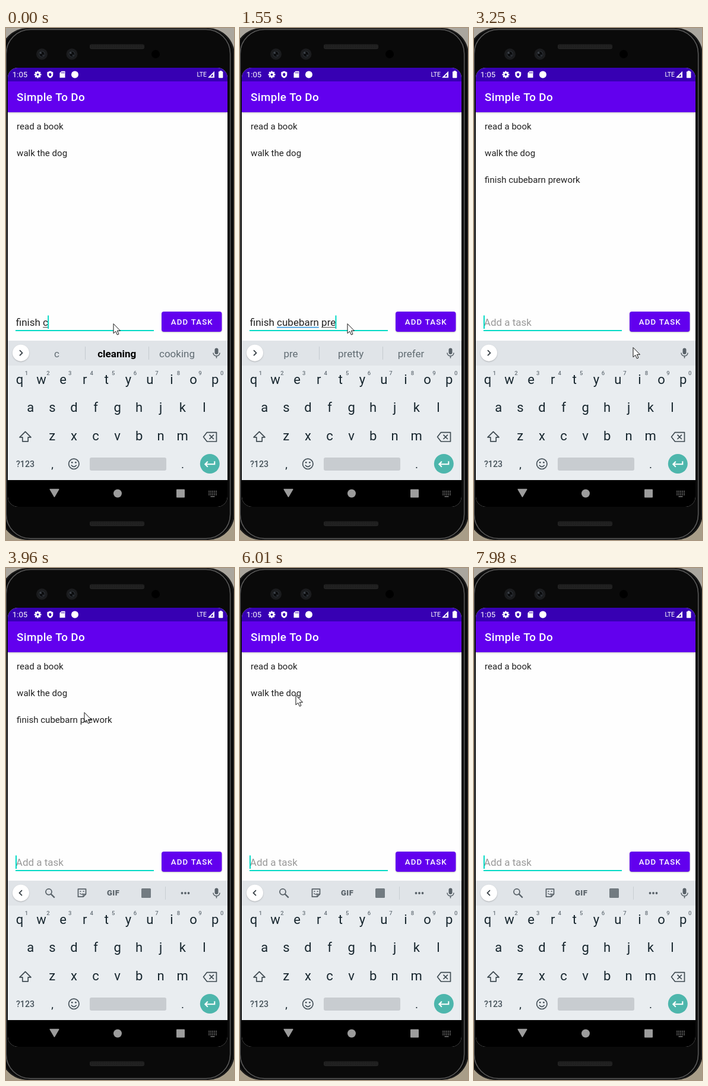
An HTML page with a canvas for the animation above (8 s loop, 384 by 863 pixels).

```html
<!DOCTYPE html>
<html lang="en">
<head>
<meta charset="utf-8">
<title>Simple To Do</title>
<style>
html, body { margin: 0; width: 100%; height: 100%; overflow: hidden; background: #000; }
canvas { display: block; width: 384px; height: 863px; }
</style>
</head>
<body>
<canvas id="stage"></canvas>
<script>
const W = 384, H = 863, LOOP = 8000;
const canvas = document.getElementById('stage');
const ctx = canvas.getContext('2d');
const ratio = window.devicePixelRatio || 1;
canvas.width = W * ratio;
canvas.height = H * ratio;

const TEAL = '#03dac5', PURPLE = '#6200ee', ICON = '#596269';
const INPUT_X = 16.8, INPUT_SIZE = 17;
const TASK = 'finish cubebarn prework';

// [start, typed text, suggestions, index of the bold one]
const typing = [
  [0, 'finish c', ['c', 'cleaning', 'cooking'], 1],
  [130, 'finish cu', ['cu', 'cut', 'cute'], 1],
  [280, 'finish cub', ['cub', 'cube', 'cubs'], -1],
  [430, 'finish cube', ['cube', 'cubes', 'cubed'], -1],
  [570, 'finish cubeb', ['cubeb', 'cube', 'cubes'], 1],
  [710, 'finish cubebar', ['cubebar', 'cube bar', 'cubes'], 1],
  [850, 'finish cubebarn', ['cubebarn', 'cube barn', 'cubes'], -1],
  [1280, 'finish cubebarn p', ['p', 'project', 'part'], -1],
  [1420, 'finish cubebarn pr', ['pr', 'project', 'pretty'], -1],
  [1550, 'finish cubebarn pre', ['pre', 'pretty', 'prefer'], -1],
  [1700, 'finish cubebarn prewo', ['prewo', 'prework', 'prewar'], 1],
  [1850, TASK, ['prework', 'pre-work', ''], 1],
  [2980, '', [], -1]
];

// [start, x, y] of the pointer tip
const pointer = [
  [0, 181, 498], [2260, 222, 502], [2410, 290, 509], [2560, 328, 514],
  [2710, 327, 505], [2850, 322, 499], [3100, 299, 516], [3250, 268, 538],
  [3400, 252, 505], [3540, 222, 430], [3680, 185, 346], [3820, 150, 277],
  [3960, 132, 243], [4100, 126, 238], [4240, 123, 248], [4380, 122, 254],
  [5300, 117, 247], [5430, 105, 231], [5570, 97, 219], [5700, 94, 214],
  [6580, 98, 230], [6720, 115, 290], [6860, 128, 370], [7000, 122, 440],
  [7140, 105, 490], [7290, 90, 513], [7430, 82, 505]
];

// Moments at which the caret switches, starting from on
const blinks = [2410, 2850, 3540, 3960, 4530, 4990, 5430, 6010, 6440, 7000, 7430, 7980];

const at = (list, t) => list.filter(k => k[0] <= t).pop();

function text(s, x, y, size, color, { weight = 400, align = 'left', spacing = 0 } = {}) {
  ctx.font = `${weight} ${size}px Roboto, sans-serif`;
  ctx.letterSpacing = spacing + 'px';
  ctx.textAlign = align;
  ctx.fillStyle = color;
  ctx.fillText(s, x, y);
}

function rect(x, y, w, h, color, r = 0) {
  ctx.fillStyle = color;
  ctx.beginPath();
  ctx.roundRect(x, y, w, h, r);
  ctx.fill();
}

function outline(x, y, w, h, r, color, width) {
  ctx.strokeStyle = color;
  ctx.lineWidth = width;
  ctx.beginPath();
  ctx.roundRect(x, y, w, h, r);
  ctx.stroke();
}

function disc(x, y, r, color) {
  ctx.fillStyle = color;
  ctx.beginPath();
  ctx.arc(x, y, r, 0, 7);
  ctx.fill();
}

function ring(x, y, r, color, width) {
  ctx.strokeStyle = color;
  ctx.lineWidth = width;
  ctx.beginPath();
  ctx.arc(x, y, r, 0, 7);
  ctx.stroke();
}

// SVG path data moved to (x, y)
function path(d, x, y, { fill, stroke, width = 1.6, join = 'miter' }) {
  const p = new Path2D(d);
  ctx.save();
  ctx.translate(x, y);
  if (fill) { ctx.fillStyle = fill; ctx.fill(p); }
  if (stroke) {
    ctx.strokeStyle = stroke;
    ctx.lineWidth = width;
    ctx.lineJoin = join;
    ctx.stroke(p);
  }
  ctx.restore();
}

function shadow(color, blur, dy) {
  ctx.shadowColor = color;
  ctx.shadowBlur = blur * ratio;
  ctx.shadowOffsetY = dy * ratio;
}
const noShadow = () => shadow('transparent', 0, 0);

function speaker(y) {
  rect(141, y, 92, 8, '#242424', 3);
  ctx.fillStyle = '#151515';
  for (let x = 143; x < 232; x += 3)
    for (let row = 1; row < 7; row += 3) ctx.fillRect(x, y + row, 1.5, 1.5);
}

function camera(x) {
  disc(x, 44, 9.5, '#1b1c1e');
  disc(x, 44, 6, '#0b0c0e');
  ring(x, 44, 5, '#2b2f34', 1.5);
  disc(x - 2, 42, 1.5, '#474d55');
  disc(x + 2, 46, 1.2, '#33383f');
}

function drawPhone() {
  const back = ctx.createLinearGradient(0, 0, 0, H);
  back.addColorStop(0, '#aaa69e');
  back.addColorStop(1, '#a89d88');
  ctx.fillStyle = back;
  ctx.fillRect(0, 0, W, H);
  rect(-9, 0, 394, H, '#0a0a0a', 45);
  outline(-7.5, 1, 391, H - 2, 44, '#2c2c2c', 1);
  outline(0.3, 2.5, 377.4, H - 5, 41, '#585858', 1.6);
  speaker(27.5);
  speaker(831.5);
  camera(60.5);
  camera(111);
  disc(252, 44, 7, '#000');
}

function drawGear(x, y) {
  for (let i = 0; i < 8; i++) {
    ctx.save();
    ctx.translate(x, y);
    ctx.rotate(i * Math.PI / 4);
    rect(-1.3, -6, 2.6, 4, '#fff', 0.5);
    ctx.restore();
  }
  ring(x, y, 3.3, '#fff', 2.4);
}

function drawBars() {
  shadow('rgba(0,0,0,.25)', 2.5, 1);
  rect(3, 90, 370, 52, PURPLE);
  noShadow();
  rect(3, 67, 370, 23, '#3700b3');
  text('1:05', 10.8, 83, 13.2, '#fff');
  drawGear(53.5, 78.5);
  path('M0-6L5-4V0C5 3 3 5 0 6C-3 5-5 3-5 0V-4Z', 74.3, 78.5, { fill: '#fff' });
  path('M0-3.2L3 0H1.7V2.6H-1.7V0H-3Z', 74.3, 78.5, { fill: '#3700b3' });
  path('M-1.5-5.5H4.5V5.5H-4.5V-2.5Z', 95, 78.3, { fill: '#fff' });
  for (const x of [93.2, 95.2, 97.2]) rect(x, 74.3, 1, 2.3, '#3700b3');
  disc(116, 78.5, 6, '#fff');
  text('LTE', 321.5, 82.3, 10.5, '#fff');
  path('M11 0V11H0Z', 340, 72.8, { fill: '#fff' });
  path('M8.5 5V9H4.5Z', 340, 72.8, { fill: '#3700b3' });
  rect(358, 73.2, 7.4, 11, '#fff', 1);
  rect(360, 72, 3.4, 2, '#fff');
  text('Simple To Do', 18.07, 123.4, 18.84, '#fff', { weight: 500, spacing: 0.35 });
}

function drawList(t) {
  const tasks = ['read a book'];
  if (t < 6440) tasks.push('walk the dog');
  if (t >= 2980 && t < 4990) tasks.push(TASK);
  tasks.forEach((s, i) => text(s, 18.07, 170.8 + i * 45.2, 15.07, '#222'));
}

function drawInput(t, typed) {
  const measure = s => ctx.measureText(s).width;
  rect(16, 509, 233, 2, TEAL);
  text(typed || 'Add a task', INPUT_X, 502.3, INPUT_SIZE, typed ? '#212121' : '#999');
  const words = typed.split(' ');
  let start = 0;
  words.forEach((word, i) => {
    const x = INPUT_X + measure(typed.slice(0, start));
    const done = i < words.length - 1;
    if (i === 1 && done) rect(x, 503.8, measure(word), 1.7, '#3f9fe0');
    else if (i > 0) rect(x, 504, measure(word), 1.1, '#4a4a4a');
    start += word.length + 1;
  });
  if (blinks.filter(b => b <= t).length % 2 === 0) {
    const x = typed ? INPUT_X + measure(typed) : INPUT_X;
    rect(x - 0.8, 484.5, 2, 22.5, TEAL);
  }
  shadow('rgba(0,0,0,.25)', 2, 1);
  rect(262, 478, 101.5, 34, t >= 2850 && t < 3100 ? '#7a2cf1' : PURPLE, 4);
  noShadow();
  text('ADD TASK', 277.8, 500.3, 13.19, '#fff', { weight: 500, spacing: 1.18 });
}

function drawTools() {
  ring(72, 545.8, 5, ICON, 1.8);
  path('M0 0L6 6', 75.8, 549.6, { stroke: ICON, width: 2.2 });
  path('M-6.5-6.5H6.5V2L2 6.5H-6.5Z', 128, 547.7, { stroke: ICON, width: 1.8, join: 'round' });
  path('M6.5 2H2V6.5M-3.5 0.5Q-1 4 2 1', 128, 547.7, { stroke: ICON, width: 1.4 });
  disc(125.4, 545, 1.1, ICON);
  disc(130.6, 545, 1.1, ICON);
  text('GIF', 180.7, 552.3, 13, ICON, { weight: 900, align: 'center', spacing: 0.5 });
  rect(228, 540, 16, 16, '#727b81', 1.5);
  rect(268, 537, 1, 22, '#c9ced2');
  for (const x of [296.5, 302, 307.5]) disc(x, 548, 1.9, ICON);
}

function drawStrip(t, words, bold) {
  const tools = t >= 3540;
  rect(3, 527, 370, 42, '#e0e4e8');
  shadow('rgba(0,0,0,.22)', 2, 1);
  disc(25, 547.7, 14, '#fff');
  noShadow();
  path(tools ? 'M2-4.5L-2.5 0L2 4.5' : 'M-2-4.5L2.5 0L-2 4.5', 25, 547.7, { stroke: '#333c42', width: 1.7 });
  if (tools) drawTools();
  else if (words.length) {
    rect(133, 537, 1, 22, '#c5cacf');
    rect(240, 537, 1, 22, '#c5cacf');
    words.forEach((s, i) => {
      const strong = i === bold;
      text(s, [85.5, 186.7, 288][i], 554.5, 17, strong ? '#000' : '#616c73',
        { weight: strong ? 700 : 400, align: 'center' });
    });
  }
  rect(351.5, 539.5, 6, 10.5, ICON, 3);
  path('M-5.5-1C-5.5 6 5.5 6 5.5-1M0 4.5V8', 354.5, 548.5, { stroke: ICON, width: 1.6 });
}

function drawKeys() {
  const ink = '#17262e', pitch = 36.57;
  rect(3, 569, 370, 193, '#e9edf0');
  const row = (keys, x, y) => [...keys].forEach((k, i) =>
    text(k, x + i * pitch, y, 22, ink, { align: 'center' }));
  row('qwertyuiop', 23, 600.3);
  row('asdfghjkl', 41.3, 647.3);
  row('zxcvbnm', 77.8, 695.3);
  [...'1234567890'].forEach((k, i) =>
    text(k, 34.5 + i * pitch, 585.3, 9.5, '#667078', { weight: 500, align: 'center' }));

  path('M0-9L9.5 0.5H4.7V7.5H-4.7V0.5H-9.5Z', 32.5, 689.3, { stroke: '#3f4b52', width: 1.7, join: 'round' });
  path('M-5-7.7H11V7.7H-5L-11 0ZM-1-3.7L6.4 3.7M6.4-3.7L-1 3.7', 343.5, 689.3,
    { stroke: '#3f4b52', width: 1.7, join: 'round' });
  text('?123', 32.5, 740, 14.2, '#46525a', { weight: 500, align: 'center' });
  text(',', 78, 741.5, 19, ink, { align: 'center' });
  text('.', 297.5, 741.5, 19, ink, { align: 'center' });
  ring(114.3, 734.8, 8.7, '#46525a', 1.7);
  disc(111.2, 732.3, 1.4, '#46525a');
  disc(117.4, 732.3, 1.4, '#46525a');
  path('M-4.5 2Q0 7.5 4.5 2', 114.3, 734.8, { stroke: '#46525a' });
  rect(141, 724, 129, 22, '#c8ccd0', 3);
  disc(343.3, 734.5, 16.5, '#4db6ac');
  path('M8-5V0H-8M-3.5-4.5L-8 0L-3.5 4.5', 343.3, 735.3, { stroke: '#fff', width: 2 });
}

function drawNav() {
  const grey = '#9c9c9c';
  rect(3, 762, 370, 45, '#000');
  path('M-7.3-6.5H7.3L0 6Z', 81.5, 784, { fill: grey, stroke: grey, width: 1.5, join: 'round' });
  disc(188, 784.5, 7, grey);
  rect(287, 777.5, 14, 14, grey, 1);
  for (let y = 0; y < 3; y++)
    for (let x = 0; x < 5; x++) rect(341.2 + x * 3, 780 + y * 2.9, 1.7, 1.7, '#777');
  rect(344.5, 789, 7, 1.4, '#777');
}

function drawPointer(t) {
  if (t >= 7550) return;
  const [, x, y] = at(pointer, t);
  path('M0 0V16.2L3.8 12.8L6.4 18.6L9 17.4L6.4 11.8H11.5Z', x, y + 0.5,
    { fill: '#fff', stroke: '#111', width: 1 });
}

function draw(t) {
  const [, typed, words, bold] = at(typing, t);
  ctx.setTransform(ratio, 0, 0, ratio, 0, 0);
  drawPhone();
  ctx.save();
  ctx.beginPath();
  ctx.roundRect(3, 67, 370, 740, 17);
  ctx.clip();
  rect(3, 67, 370, 740, '#fefefe');
  drawBars();
  drawList(t);
  drawInput(t, typed);
  drawStrip(t, words, bold);
  drawKeys();
  drawNav();
  ctx.restore();
  drawPointer(t);
}

let begin;
function tick(now) {
  begin ??= now;
  draw(Math.max(0, now - begin) % LOOP);
  requestAnimationFrame(tick);
}
draw(0);
requestAnimationFrame(tick);
</script>
</body>
</html>
```
